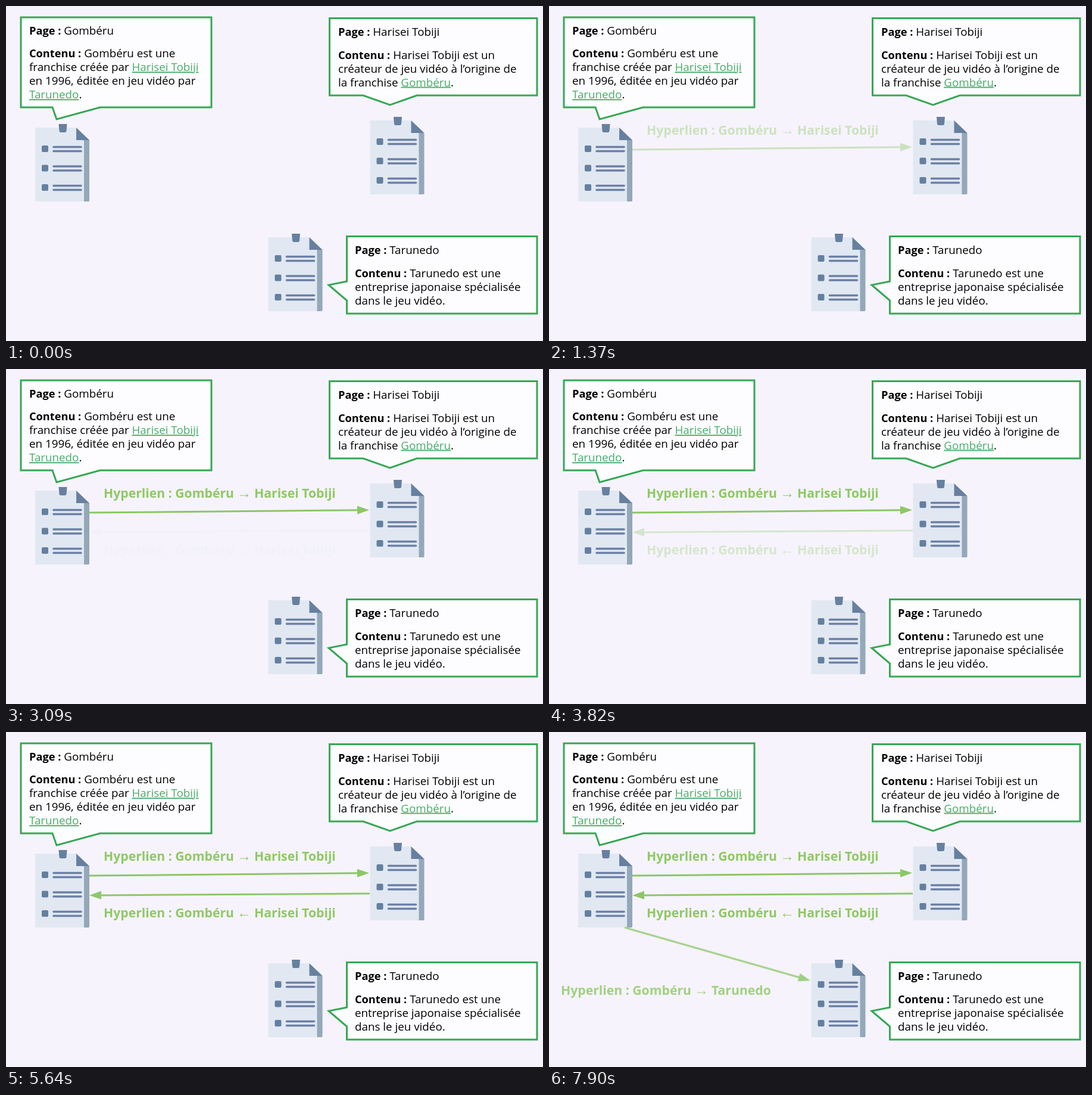
These frames come from a looping animation (902 px wide and 562 px high, 8000 ms). An HTML page:

```html
<!DOCTYPE html>
<html lang="fr">
<head>
<meta charset="utf-8">
<title>Hyperliens entre pages</title>
<style>
  html, body { margin: 0; width: 100%; height: 100%; overflow: hidden; background: #f6f3fc; }
  svg { display: block; width: 902px; height: 562px; font: 18.8px "Open Sans", "Noto Sans", sans-serif; }
  .bubble { fill: #fdfdff; stroke: #35a854; stroke-width: 3; }
  .key { font-weight: bold; font-size: 18.2px; }
  .ref { fill: #48ad68; text-decoration: underline; }
  .label { font-weight: bold; font-size: 21.2px; fill: #8ec963; }
  .sign { font: 24px "Liberation Serif", "Times New Roman", serif; }
  .shaft { stroke: #8bc766; stroke-width: 3; }
  .head { fill: #8bc766; }
</style>
</head>
<body>
<svg id="stage" viewBox="0 0 902 562">
  <defs>
    <g id="sheet">
      <path d="M0 6H69L91 27V130H0Z" fill="#e1e8f2"/>
      <path d="M82 27H91V128Q91 130 89 130H82Z" fill="#94a8b9"/>
      <path d="M69 6L91 27H69Z" fill="#67809f"/>
      <path d="M39.5 0H53.5L52.5 12Q52 14 50 14H43Q41 14 40.5 12Z" fill="#67809f"/>
      <g id="row">
        <rect x="11" y="36" width="11" height="11" rx="2" fill="#64809f"/>
        <path d="M31 38.5H77M31 45.5H77" stroke="#6c80a6" stroke-width="3.6" stroke-linecap="round"/>
      </g>
      <use href="#row" y="32.5"/>
      <use href="#row" y="65"/>
    </g>
  </defs>
</svg>
<script>
const LOOP = 8000, HOLD = 500, FADE = 2700;
const stage = document.getElementById("stage");
const franchise = "Gombéru", creator = "Harisei Tobiji", company = "Tarunedo";

const ref = name => `<tspan class="ref">${name}</tspan>`;
const key = word => `<tspan class="key">${word} :</tspan> `;
const sheet = (x, y) => `<use href="#sheet" x="${x}" y="${y}"/>`;

function bubble(outline, x, y, title, lines) {
  const content = lines.map((line, i) =>
    `<text x="${x}" y="${y + 38.3 + 23 * i}">${i ? "" : key("Contenu")}${line}</text>`);
  return `<path class="bubble" d="${outline}"/>
    <text x="${x}" y="${y}">${key("Page")}${title}</text>${content.join("")}`;
}

function arrow(x1, y1, x2, y2) {
  const length = Math.hypot(x2 - x1, y2 - y1);
  const angle = Math.atan2(y2 - y1, x2 - x1) * 180 / Math.PI;
  return `<g transform="translate(${x1} ${y1}) rotate(${angle})">
    <path class="shaft" d="M0 0H${length - 17}"/>
    <path class="head" d="M${length} 0l-20 -7v14Z"/></g>`;
}

function link(start, x, y, sign, target, ends) {
  return `<g class="link" data-start="${start}">${arrow(...ends)}
    <text class="label" x="${x}" y="${y}">Hyperlien : ${franchise}<tspan
      class="sign" x="${x + 224}">${sign}</tspan><tspan x="${x + 253}">${target}</tspan></text></g>`;
}

stage.innerHTML += [
  sheet(49, 198), sheet(611.5, 186), sheet(440.5, 382),
  bubble("M25 19H345V170H158L85 190L78 170H25Z", 39, 48, franchise, [
    `${franchise} est une`,
    `franchise créée par ${ref(creator)}`,
    "en 1996, éditée en jeu vidéo par",
    `${ref(company)}.`]),
  bubble("M543.5 20.5H892V150H690L645 166L600 150H543.5Z", 558, 50.3, creator, [
    `${creator} est un`,
    "créateur de jeu vidéo à l’origine de",
    `la franchise ${ref(franchise)}.`]),
  bubble("M572.5 386.5H892V516H572.5V494L542 468L572.5 462Z", 586, 416.3, company, [
    `${company} est une`,
    "entreprise japonaise spécialisée",
    "dans le jeu vidéo."]),
  link(300, 164, 216, "→", creator, [140, 241, 610, 236.5]),
  link(3000, 164, 311, "←", creator, [611, 271, 140, 274]),
  link(5700, 20, 441, "→", company, [127, 328, 439, 417])
].join("");

const links = [...stage.querySelectorAll(".link")];

function draw(now) {
  const time = now % LOOP;
  for (const item of links) {
    const progress = time < HOLD ? 0 : (time - item.dataset.start) / FADE;
    item.style.opacity = Math.min(1, Math.max(0, progress));
  }
  requestAnimationFrame(draw);
}
draw(performance.now());
</script>
</body>
</html>
```
